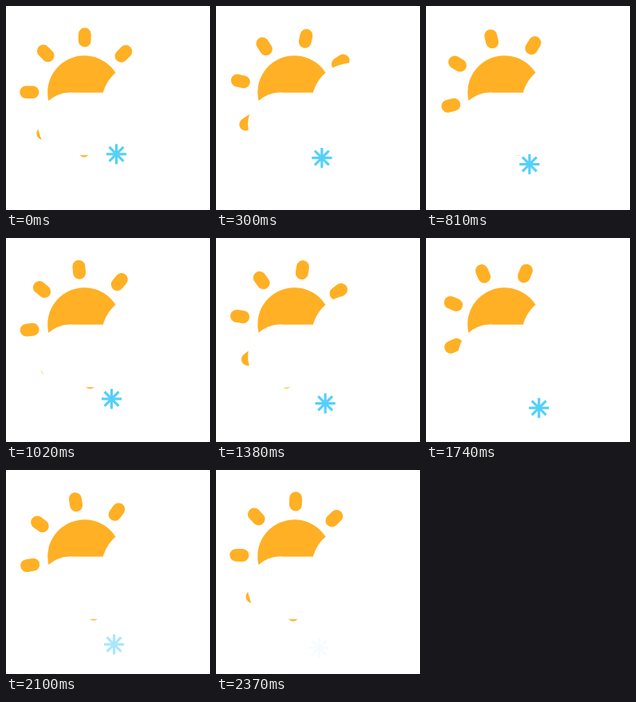
An HTML page that plays this animation: 256 px wide and 256 px high, repeating every 2.4 s.

```html
<!DOCTYPE html>
<html lang="en">
<head>
<meta charset="utf-8">
<title>Sun, cloud and snow</title>
<style>
  html, body { margin: 0; width: 100%; height: 100%; overflow: hidden; background: #fff; }
  svg { display: block; width: 100%; height: 100%; }
</style>
</head>
<body>
<svg viewBox="0 0 256 256">
  <g id="sun" fill="#ffb024" stroke="#ffb024">
    <circle r="46.2" stroke="none"/>
    <g id="rays" stroke-width="15.9" stroke-linecap="round"></g>
  </g>
  <g id="cloud" fill="#fff">
    <circle cx="80" cy="148.6" r="40"/>
    <circle cx="170.7" cy="122.2" r="50.7"/>
    <rect x="80" y="108.7" width="120" height="78.6"/>
  </g>
  <g id="flake" stroke="#55d0f8" stroke-width="3.2"></g>
</svg>
<script>
const LOOP = 2400, STEP = 30;
const SPIN = 0.0384; // degrees per ms
const sun = document.getElementById('sun');
const flake = document.getElementById('flake');

function addLine(parent, y1, y2, angle) {
  const line = document.createElementNS('http://www.w3.org/2000/svg', 'line');
  line.setAttribute('y1', y1);
  line.setAttribute('y2', y2);
  line.setAttribute('transform', `rotate(${angle})`);
  parent.appendChild(line);
}

const rays = document.getElementById('rays');
for (let i = 0; i < 8; i++) addLine(rays, -73.2, -65, i * 45);
for (let i = 0; i < 4; i++) addLine(flake, -12.6, 12.6, i * 45);

// Piecewise linear value through [time, value] points
function track(points, t) {
  let i = 1;
  while (i < points.length - 1 && t > points[i][0]) i++;
  const [t0, v0] = points[i - 1], [t1, v1] = points[i];
  return v0 + (v1 - v0) * (t - t0) / (t1 - t0);
}

const drift = [[0, 138.5], [600, 127.2], [1800, 142.5], [2400, 128.7]];
const fade = [[0, 1], [1800, 1], [2400, 0]];

function draw(t) {
  sun.setAttribute('transform', `translate(98.4 108.5) rotate(${0.3 + SPIN * t})`);
  flake.setAttribute('transform', `translate(${track(drift, t)} ${185.9 + 0.0157 * t})`);
  flake.setAttribute('opacity', track(fade, t));
}

const start = performance.now();
function tick() {
  const t = (performance.now() - start) % LOOP;
  draw(Math.floor(t / STEP) * STEP);
  requestAnimationFrame(tick);
}
draw(0);
requestAnimationFrame(tick);
</script>
</body>
</html>
```
